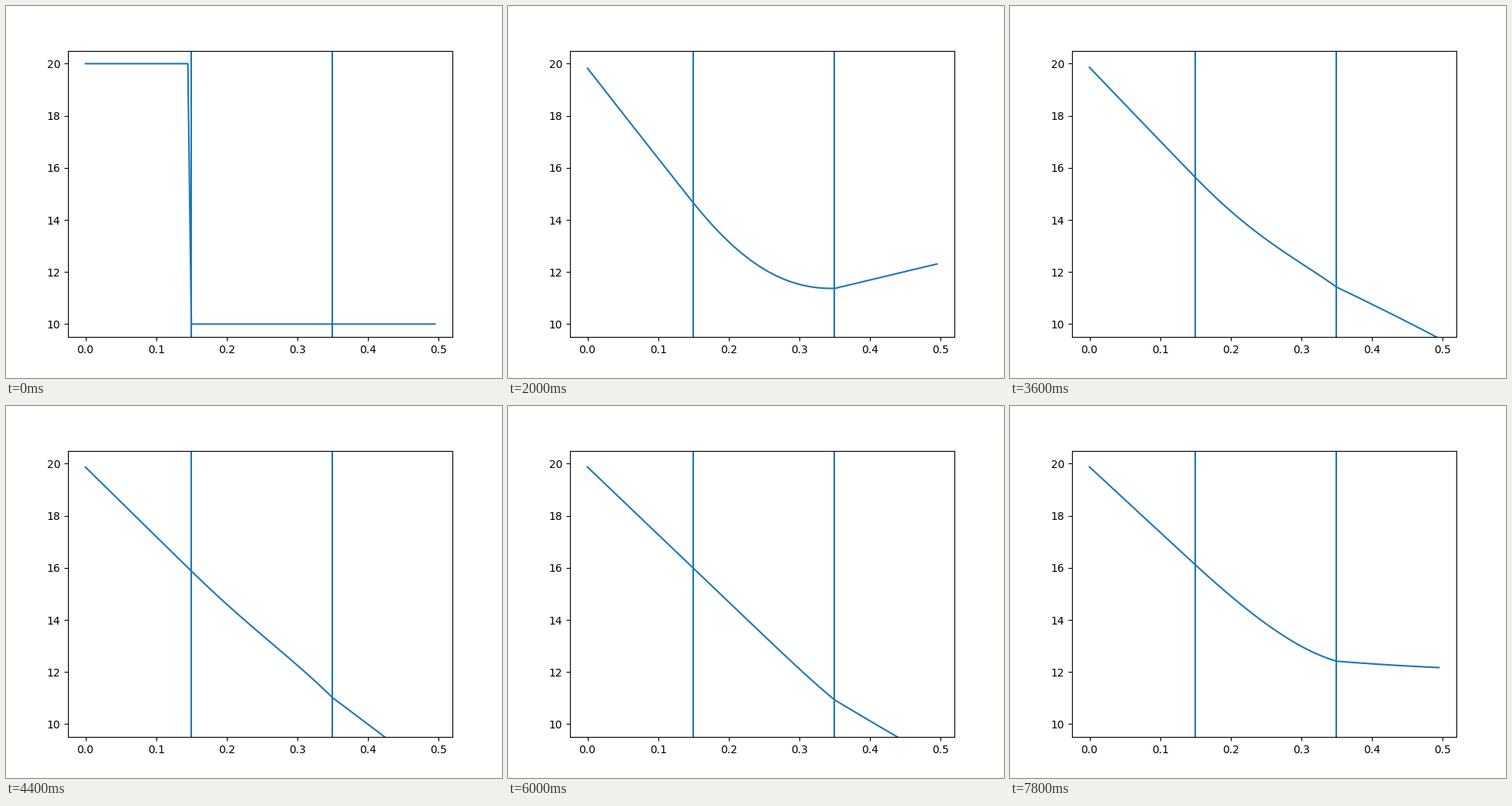
Recreate the animation shown at these times as a matplotlib script. Size 640 by 480 pixels, loop 8 s.

```python
import numpy as np
import matplotlib.pyplot as plt
from matplotlib.animation import FuncAnimation

FRAMES, INTERVAL = 40, 200
SUBSTEPS = 40
DX = 0.005
WALLS = (0.15, 0.35)

# Layer diffusivities in m^2 per frame
ALPHA = (0.02, 0.0011, 0.03)
SINK = 6.2            # gradient drop at the second interface
INSIDE, OUTSIDE = 20.0, 10.0
SWING, PERIOD = 2.46, 33.3

x = np.arange(100) * DX
n = len(x)
first, second = (round(w / DX) for w in WALLS)
layer = (np.arange(n) >= first).astype(int) + (np.arange(n) >= second)


def outside(t):
    return OUTSIDE + SWING * np.sin(2 * np.pi * t / PERIOD)


def simulate():
    """Implicit heat conduction through three layers, one profile per frame."""
    dt = 1 / SUBSTEPS
    c = np.array(ALPHA)[layer] * dt / DX**2
    lap = np.diag(np.full(n, -2.0)) + np.eye(n, k=1) + np.eye(n, k=-1)
    step = np.linalg.inv(np.eye(n) - c[:, None] * lap)
    temp = np.where(np.arange(n) < first, INSIDE, OUTSIDE)
    profiles = [temp]
    for i in range(1, FRAMES):
        for j in range(1, SUBSTEPS + 1):
            edge = np.zeros(n)
            edge[0] = INSIDE
            edge[-1] = outside(i - 1 + j * dt)
            edge[second] = -SINK * DX
            temp = step @ (temp + c * edge)
        profiles.append(temp)
    return profiles


profiles = simulate()

fig, ax = plt.subplots(figsize=(6.4, 4.8), dpi=100)
line, = ax.plot(x, profiles[0])
for wall in WALLS:
    ax.axvline(wall)
ax.set_xlim(-0.02475, 0.51975)
ax.set_ylim(9.5, 20.5)


def update(i):
    line.set_ydata(profiles[i])
    return line,


anim = FuncAnimation(fig, update, frames=FRAMES, interval=INTERVAL,
                     repeat=True, repeat_delay=0)
plt.show()
```
